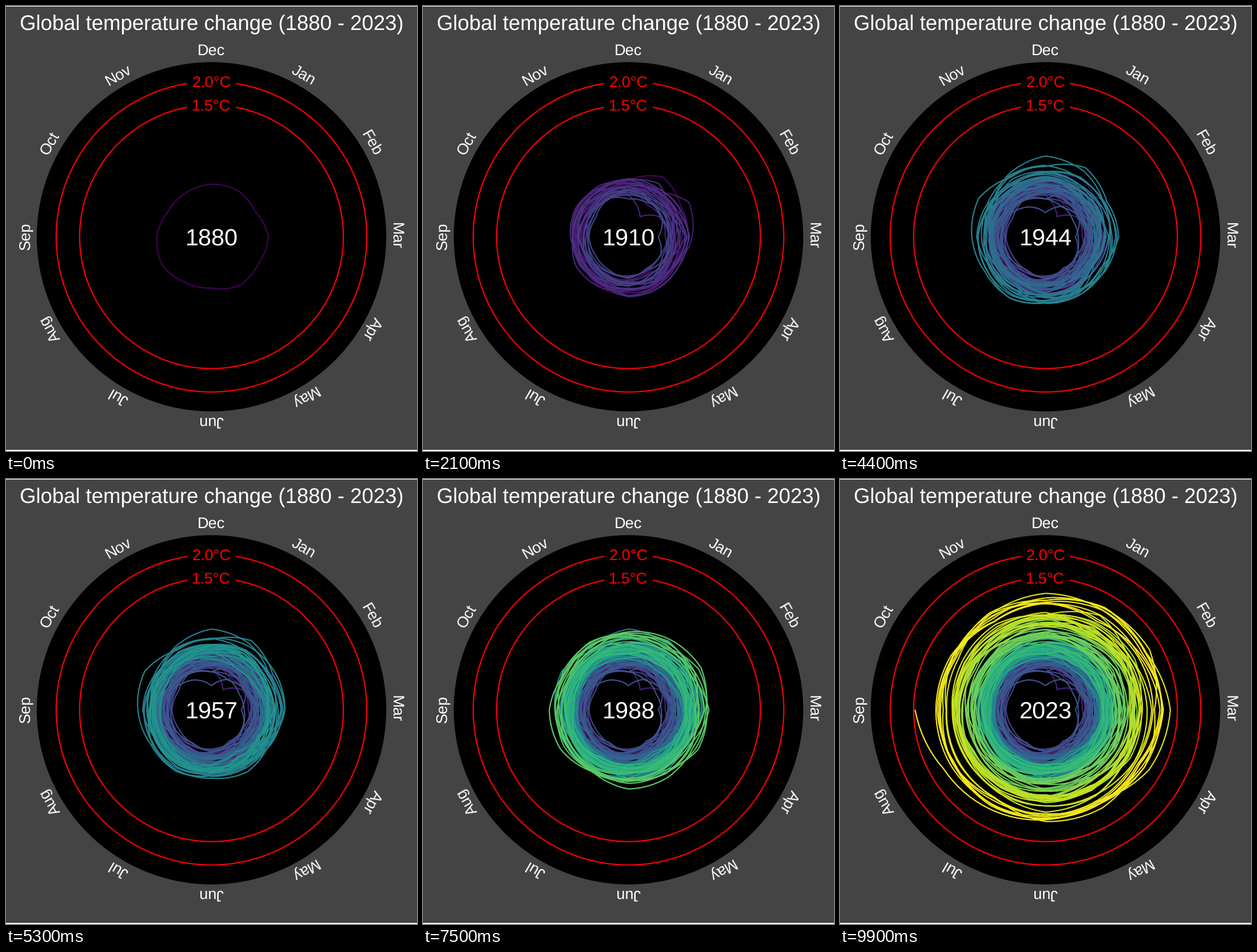
Animation of 719x779 px, one loop 10 s. Source, as a matplotlib script:

```python
import matplotlib.pyplot as plt
import numpy as np
from matplotlib.animation import FuncAnimation
from matplotlib.collections import LineCollection
from matplotlib.patches import Circle, Rectangle

W, H, DPI = 719, 779, 64
PT = 72 / DPI  # points per pixel
CX, CY = 359.5, 404
FRAMES, STEP = 100, 100
FIRST, LAST = 1880, 2023
YEARS = np.arange(FIRST, LAST + 1)
LAST_MONTH = 9  # the final year stops in September
MONTHS = "Jan Feb Mar Apr May Jun Jul Aug Sep Oct Nov Dec".split()
LINE = 2.2 * PT

plt.rcParams["font.family"] = "Liberation Sans"
plt.rcParams["text.hinting"] = "none"

# Long-term drift: (year, anomaly)
TREND = [(1880, -.17), (1887, -.33), (1899, -.15), (1909, -.46), (1915, -.22),
         (1917, -.42), (1926, -.18), (1937, -.08), (1944, .17), (1950, -.12),
         (1960, 0), (1976, -.04), (1981, .25), (1993, .28), (1998, .53),
         (2012, .65), (2016, .98), (2023, 1.0)]

# Months that stand out: (year, month, anomaly)
PEAKS = [(1882, 1, .16), (1889, 2, .17), (1893, 1, -.82), (1916, 12, -.80),
         (1939, 12, .41), (1944, 1, .39), (1944, 10, .33), (1998, 2, .88),
         (2007, 1, 1.01), (2015, 12, 1.15), (2016, 3, 1.35), (2020, 2, 1.25)]

OPENING = [-.18, -.24, -.10, -.16, -.11, -.22, -.19, -.10, -.15, -.24, -.23, -.19]
CLOSING = [(1, .87), (3, 1.2), (5, .95), (8, 1.2), (9, 1.47)]  # (month, anomaly)


def radius(temp):
    return 107.7 + 82 * temp


def polar(r, turn, cx=CX, cy=CY):
    """Point at radius r, clockwise from the top by an angle in radians."""
    return cx + r * np.sin(turn), cy - r * np.cos(turn)


def monthly_temps():
    rng = np.random.default_rng(12)
    n = len(YEARS) * 12
    k = np.arange(n)
    month = k % 12 + 1
    drift = np.interp(FIRST + (k - 5.5) / 12, *zip(*TREND))
    wobble = np.interp(k, np.arange(6, n, 12), rng.normal(0, .05, len(YEARS)).clip(-.08, .08))
    season = np.cos(2 * np.pi * (month - 2.5) / 12)
    noise = np.zeros(n)
    for i in range(1, n):
        noise[i] = .4 * noise[i - 1] + .9 * rng.normal()
    temps = drift * (1 + .08 * season) + wobble
    temps += (.08 + .02 * season) * noise.clip(-1.6, 1.6)
    for year, m, value in PEAKS:
        at = (year - FIRST) * 12 + m - 1
        temps += (value - temps[at]) * .4 ** np.abs(k - at)
    temps = temps.reshape(-1, 12)
    temps[0] = OPENING
    temps[-1] = np.interp(np.arange(1, 13), *zip(*CLOSING))
    return temps


def year_paths(temps):
    paths = []
    for i, row in enumerate(temps):
        start = temps[i - 1, -1] if i else row[-1]
        knots = np.concatenate([[start], row])
        end = LAST_MONTH if YEARS[i] == LAST else 12
        m = np.linspace(0, end, end * 8 + 1)
        r = radius(np.interp(m, np.arange(13), knots))
        paths.append(np.column_stack(polar(r, m * np.pi / 6)))
    return paths


fig = plt.figure(figsize=(W / DPI, H / DPI), dpi=DPI, facecolor="white")
ax = fig.add_axes([0, 0, 1, 1])
ax.set(xlim=(0, W), ylim=(H, 0))
ax.axis("off")


def label(x, y, text, size, color="white", angle=0):
    return ax.text(x, y, text, fontsize=size * PT, color=color, ha="center",
                   va="baseline", rotation=angle, rotation_mode="anchor", zorder=5)


ax.add_patch(Rectangle((0, 1), W, 776, fc="#444444", lw=0, zorder=0))
ax.add_patch(Circle((CX, CY), 305.7, fc="black", lw=0, zorder=1))

for temp, base_y in ((1.5, 183.7), (2.0, 142.7)):
    ax.add_patch(Circle((CX, CY), radius(temp), fill=False, ec="red", lw=LINE, zorder=2))
    ax.add_patch(Rectangle((317, base_y - 26), 85, 33, fc="black", lw=0, zorder=3))
    label(CX, base_y, f"{temp:.1f}°C", 27.1, "red")

for k, name in enumerate(MONTHS, 1):
    x, y = polar(316.8, k * np.pi / 6, CX - 1, CY - 1.5)
    label(x, y, name, 27.1, angle=-30 * k)

label(CX, 42.3, f"Global temperature change ({FIRST} - {LAST})", 36.5)
counter = label(CX, 419.5, str(FIRST), 41.4)

paths = year_paths(monthly_temps())
colors = plt.get_cmap("viridis")((YEARS - FIRST) / (LAST - FIRST))
spiral = LineCollection([], colors=colors, linewidths=LINE, zorder=4)
ax.add_collection(spiral, autolim=False)


def draw(i):
    shown = round(i * (LAST - FIRST) / (FRAMES - 1))
    spiral.set_segments(paths[:shown + 1])
    counter.set_text(str(FIRST + shown))
    return spiral, counter


anim = FuncAnimation(fig, draw, frames=FRAMES, interval=STEP, repeat=True, repeat_delay=0)
plt.show()
```
